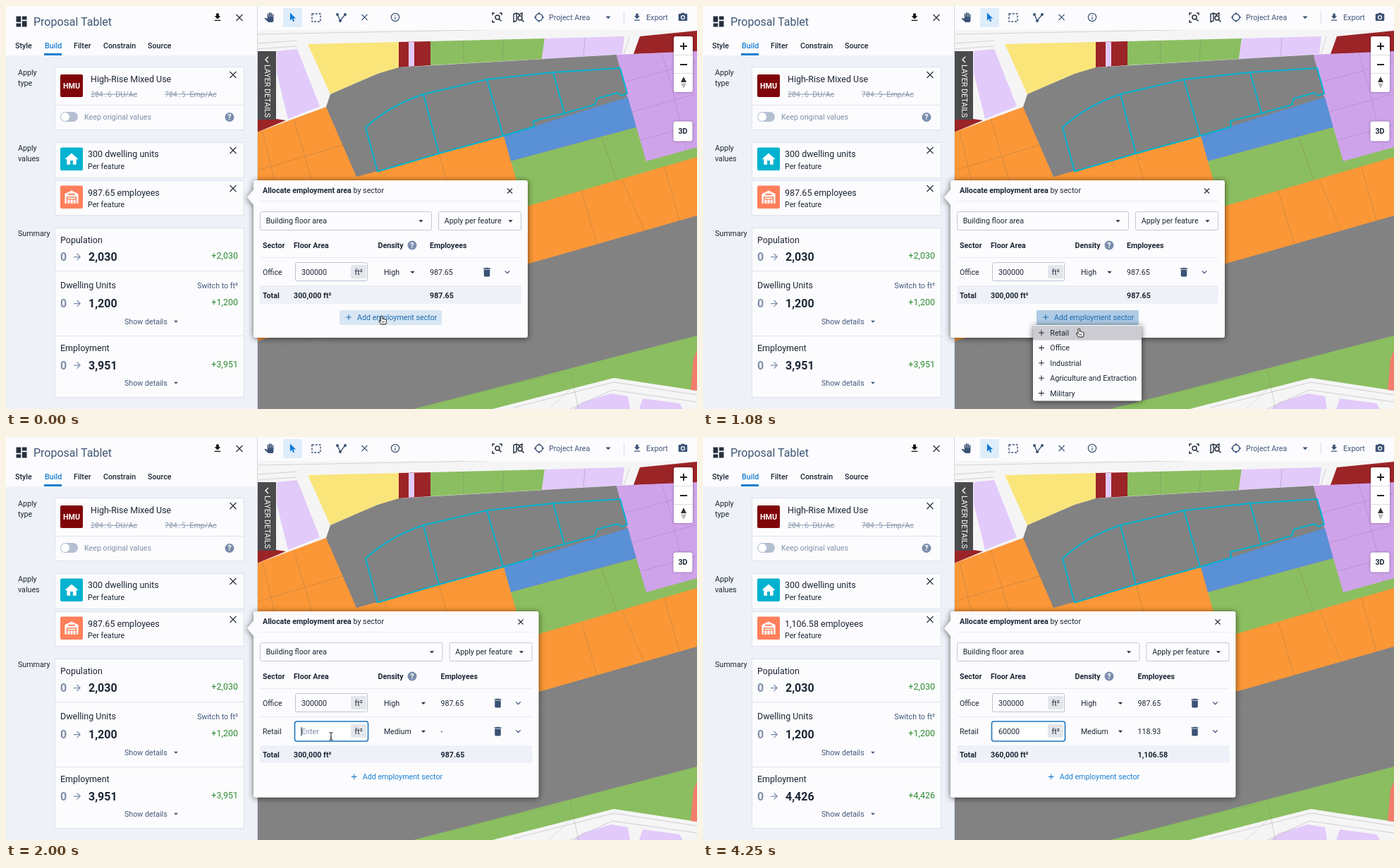
These frames come from a looping animation (980x571 px, 4410 ms). An HTML page:

```html
<!DOCTYPE html>
<html lang="en">
<head>
<meta charset="utf-8">
<title>Employment allocation</title>
<style>
  html, body { margin: 0; width: 100%; height: 100%; overflow: hidden; background: #fcfcfe; }
  svg { display: block; width: 100vw; height: 100vh; }
  text { font: 10.7px Roboto, sans-serif; fill: #1c2634; white-space: pre; }
  .bold { font-weight: 700; }
  .med { font-weight: 500; }
  .mid { font-size: 12.5px; }
  .big { font-size: 16px; font-weight: 700; }
  .title { font-size: 16px; fill: #3f5675; }
  .slate { fill: #41577a; }
  .muted { fill: #8090a8; }
  .blue { fill: #1b7fd1; }
  .deep { fill: #1c6aae; }
  .green { fill: #2e8b33; }
  .white { fill: #fff; }
  .old { fill: #8999ae; text-decoration: line-through; }
  .mono { font: 10px "Noto Sans Mono", monospace; }
  .end { text-anchor: end; }
  .center { text-anchor: middle; }
  .pop { filter: drop-shadow(0 1px 4px #0009); }
  .soft { filter: drop-shadow(0 0 1.5px #0006); }
</style>
</head>
<body>
<svg viewBox="0 0 980 571"><g id="base"></g><g id="live"></g></svg>
<script>
const INK = '#26303d', SLATE = '#3b5275', GREY = '#7a8dab', BLUE = '#1b7fd1', TEAL = '#00b2cf';
const PANEL = '#fcfcfe', PALE = '#eef2f8', RULE = '#dde3ec';
const ICONS = {
  download: 'M5 20h14v-2H5v2zM19 9h-4V3H9v6H5l7 7 7-7z',
  home: 'M10 20v-6h4v6h5v-8h3L12 3 2 12h3v8z',
  trash: 'M6 19c0 1.1.9 2 2 2h8c1.1 0 2-.9 2-2V7H6v12zM19 4h-3.5l-1-1h-5l-1 1H5v2h14V4z',
  drop: 'M7 10l5 5 5-5z',
  more: 'M16.6 8.6L12 13.2 7.4 8.6 6 10l6 6 6-6z',
  tiles: 'M3 13h8V3H3v10zm0 8h8v-6H3v6zm10 0h8V11h-8v10zm0-18v6h8V3h-8z',
  next: 'M12 4l-1.4 1.4L16.2 11H4v2h12.2l-5.6 5.6L12 20l8-8z',
  plus: 'M19 13h-6v6h-2v-6H5v-2h6V5h2v6h6v2z',
  info: 'M11 7h2v2h-2zm0 4h2v6h-2zm1-9a10 10 0 1 0 0 20a10 10 0 1 0 0-20zm0 18a8 8 0 1 1 0-16a8 8 0 1 1 0 16z',
  camera: 'M9 2L7.2 4H4c-1.1 0-2 .9-2 2v12c0 1.1.9 2 2 2h16c1.1 0 2-.9 2-2V6c0-1.1-.9-2-2-2h-3.2L15 2H9zm3 15a5 5 0 1 1 0-10a5 5 0 1 1 0 10zm0-2a3 3 0 1 0 0-6a3 3 0 1 0 0 6z',
  pointer: 'M5 1v19l4.6-4.4 3 7 3.2-1.4-3-6.8H19z',
  pan: 'M23 5.5V20c0 2.2-1.8 4-4 4h-7.3c-1 0-2-.4-2.8-1.2L1 14.8s1.3-1.3 2-1.5l5 2.6V4a1.5 1.5 0 0 1 3 0v7h1V1.5a1.5 1.5 0 0 1 3 0V11h1V2.5a1.5 1.5 0 0 1 3 0V11h1V5.5a1.5 1.5 0 0 1 3 0z',
  depot: 'M12 2L2 7v14h2.500V11h15v10H22V7zM7 6.500h10v2H7zM6 12.500h12v1.500H6zM6 15.500h3.300V21H6zm4.400 0h3.300V21h-3.300zm4.400 0H18V21h-3.200z'
};

const text = (x, y, s, cls = '') => `<text x="${x}" y="${y}" class="${cls}">${s}</text>`;
const rect = (x, y, w, h, fill, extra = '') =>
  `<rect x="${x}" y="${y}" width="${w}" height="${h}" fill="${fill}" ${extra}/>`;
const box = (x, y, w, h, stroke, r = 0, fill = PANEL) =>
  rect(x + .5, y + .5, w - 1, h - 1, fill, `stroke="${stroke}" rx="${r}"`);
const line = (d, stroke, width = 1, extra = '') =>
  `<path d="${d}" fill="none" stroke="${stroke}" stroke-width="${width}" ${extra}/>`;
const poly = (points, fill) => `<polygon points="${points}" fill="${fill}"/>`;
const icon = (name, x, y, size, fill = INK) =>
  `<path d="${ICONS[name]}" fill="${fill}" fill-rule="evenodd" transform="translate(${x - size / 2} ${y - size / 2}) scale(${size / 24})"/>`;
const cross = (x, y, r, color = INK) =>
  line(`M${x - r} ${y - r}l${2 * r} ${2 * r}m0 ${-2 * r}l${-2 * r} ${2 * r}`, color, 1.2);
const help = (x, y) => `<circle cx="${x}" cy="${y}" r="6.5" fill="${GREY}"/>` + text(x, y + 3.8, '?', 'bold white center');

function cityMap() {
  const grey = '#828283', orange = '#fb9737', green = '#8bbe60', lilac = '#e2cafa',
    purple = '#cfa3ea', red = '#9b2427';
  return rect(356, 34, 624, 537, '#f5f5f6') +
    line('M356 40L980 28M356 53L413 49M356 61L412 57M884 44L876 69', '#d2d2d5') +
    poly('428,54 557,51 557,89 527,96 460,125', '#fae57b') +
    poly('557,51 602,50 602,84 557,87', red) + poly('571,51 579,51 579,85 571,86', lilac) +
    poly('602,50 764,46 760,75 602,84', green) + poly('764,46 877,43 874,68 760,75', lilac) +
    poly('899,43 980,35 980,65 890,68', red) +
    poly('384,64 413,61 445,142 400,160 384,95', lilac) + poly('356,160 383,160 397,162 356,179', red) +
    poly('356,179 454,143 866,90 980,90 980,300 356,478', orange) +
    poly('460,125 527,96 557,87 866,69 894,172 706,184 497,242 454,143', grey) +
    poly('866,69 980,64 980,205 905,225', purple) +
    poly('706,184 882,129 894,172 716,220', '#5a90d5') +
    poly('716,220 894,172 908,220 980,200 980,214 735,285', green) +
    poly('356,475 980,297 980,571 356,571', grey) +
    poly('578,571 980,467 980,571', green) +
    poly('690,571 862,527 980,545 980,571', '#f5f5f6') +
    poly('805,571 818,561 858,549 882,553 885,571', lilac) +
    poly('898,571 903,556 955,563 960,571', lilac) + poly('975,500 980,488 980,545 971,544', '#f27d6c') +
    line('M720 569L862 533L980 551M800 571L860 544L980 561', '#cfcfd3') +
    line('M649 49V81M706 47L704 78M821 45L819 71', '#77777755') +
    line('M875 108L980 80M888 150L980 124M900 190L980 168M930 67L943 110L965 204', '#88669944') +
    line('M356 233L478 197M364 178L386 270M408 160L434 247M614 209L625 247M816 262L838 337M874 246L905 318M934 228L955 304M845 186L866 247', '#8a704d55') +
    line('M470 125L700 185L860 90M530 96L640 190M356 500L980 322M770 571L980 378', '#92929444') +
    line('M800 514L812 571M625 559L700 540L790 519', '#76945e55') +
    line('M510 172Q544 141 592 125L682 104L776 94L871 88L881 124L873 127L867 123L838 131L835 140L792 152L748 163L749 171L705 184L614 209L527 234.500ZM592 125L614 209M682 104L705 184M776 94L792 152', TEAL, 2);
}

function toolbar() {
  const dashed = (x, y) => line(`M${x} ${y}h12v11h-12z`, SLATE, 1.4, 'stroke-dasharray="3 1.8"');
  const lens = (x, y) => line(`M${x + 3} ${y}a3 3 0 1 0-6 0a3 3 0 1 0 6 0m-1 2l3.5 3.5`, INK, 1.5);
  return rect(356, 0, 624, 34, PANEL) + line('M356.5 0V571', '#d3d9e2') +
    icon('pan', 373, 16, 14, SLATE) + rect(393, 3, 27, 27, '#dfedfa', 'rx="2"') + icon('pointer', 407, 16, 14, '#0f7ad8') +
    dashed(434, 11) + line('M470 12L474 21L481 12', SLATE, 1.4) +
    [[470, 12], [481, 12], [474, 21]].map(([x, y]) => `<circle cx="${x}" cy="${y}" r="2" fill="${SLATE}"/>`).join('') +
    cross(508.5, 16, 4, SLATE) + icon('info', 552, 16, 15, SLATE) +
    line('M690 13v-3h3m7 0h3v3m-13 7v3h3', INK, 1.5) + lens(697, 16) +
    line('M732 14V10l-4 2l-4-2l-4 1.5v11l4-1.5M724 10v11m4-9v2', INK, 1.4) + lens(729, 17) +
    line('M761 16a5 5 0 1 0-10 0a5 5 0 1 0 10 0M756 9v3m0 8v3m-7-7h3m8 0h3', SLATE, 1.4) +
    text(770, 20, 'Project Area', 'slate') + icon('drop', 854, 16, 17, SLATE) +
    line('M876.5 8V25', '#d3d9e2') + icon('download', 895, 16, 14, SLATE) +
    text(908, 20, 'Export', 'slate') + icon('camera', 960, 16, 15, SLATE);
}

function mapControls() {
  return rect(357, 64, 26, 97, '#4b4b4e') + line('M372 72l-4 4l4 4', '#fff', 1.4) +
    `<g transform="translate(366.5 83) rotate(90)">${text(0, 0, 'LAYER DETAILS', 'white')}</g>` +
    `<g class="soft">${rect(947, 43, 27, 79, '#fff', 'rx="3"') + rect(946.5, 163.5, 27, 28, '#fff', 'rx="3"')}</g>` +
    line('M947 69.5h27M947 95.5h27', '#ddd') + line('M956 57h10m-5-5v10M956 83h10', '#222', 2) +
    poly('957,108 965,108 961,100', '#333') + poly('957,109.5 965,109.5 961,117', '#bbb') +
    text(960, 181.3, '3D', 'bold center');
}

function sidePanel() {
  const tabs = [[13, 'Style'], [55, 'Build'], [96, 'Filter'], [138, 'Constrain'], [201, 'Source']];
  const counter = (y, total) => text(77, y, '0', 'big muted') + icon('next', 101, y - 5.5, 15, GREY) +
    (total ? text(117, y, total, 'big') : '');
  const details = y => text(168, y, 'Show details', 'slate') + icon('drop', 241, y - 3.5, 14, SLATE);
  const tile = (y, fill, name) => rect(77, y, 32, 32.5, fill, 'rx="2"') + icon(name, 93, y + 16.5, 23, '#fff');
  return rect(0, 0, 356, 70, PANEL) + rect(0, 70, 356, 501, PALE) +
    icon('tiles', 22, 22, 20) + text(39, 27.5, 'Proposal Tablet', 'title') +
    icon('download', 300, 16, 15, '#111') + cross(331, 16.5, 4.5) +
    tabs.map(([x, s]) => text(x, 60, s, s === 'Build' ? 'med blue' : 'med')).join('') + rect(54, 67, 25, 3, BLUE) +
    text(17, 97.5, 'Apply') + text(17, 112.5, 'type') + text(17, 204.5, 'Apply') + text(17, 219.5, 'values') + text(17, 325.5, 'Summary') +
    box(69, 86, 269, 90, RULE) + box(69, 193, 269, 51, RULE) + box(69, 247, 269, 50, RULE) + box(69, 314, 269, 241, RULE) +
    line('M69 140.5h268M69 375.5h268M69 467.5h268', RULE) +
    rect(77, 97, 32, 32, '#800508', 'rx="2"') + text(93, 117, 'HMU', 'bold white center') +
    text(120, 108, 'High-Rise Mixed Use', 'mid') + [97.5, 204.5, 258.5].map(y => cross(322, y, 4.5)).join('') +
    text(120, 128.5, '204.6', 'old mono') + text(150, 128.5, '  DU/Ac', 'old') +
    text(225, 128.5, '704.5', 'old mono') + text(255, 128.5, '  Emp/Ac', 'old') +
    rect(77, 150, 25, 14, '#b4c0d1', 'rx="7"') + '<circle cx="84" cy="157" r="6" fill="#fff"/>' +
    text(111, 161, 'Keep original values', 'muted') + help(317, 157.5) +
    tile(200.5, TEAL, 'home') + text(116, 214, '300 dwelling units', 'mid') + text(116, 230.5, 'Per feature') +
    tile(254.5, '#ff7f5b', 'depot') + text(116, 284.5, 'Per feature') +
    text(77, 335.5, 'Population', 'mid') + counter(361, '2,030') + text(329, 358, '+2,030', 'mid green end') +
    text(77, 399.5, 'Dwelling Units', 'mid') + text(329, 399.5, 'Switch to ft²', 'slate end') +
    counter(427, '1,200') + text(329, 423.5, '+1,200', 'mid green end') + details(450.5) +
    text(77, 489, 'Employment', 'mid') + counter(514.5) + details(537.5);
}

function tableRow(y, dx, label, area, density, staff, focused) {
  return text(364, y + 3.8, label) +
    (focused ? rect(409.5, y - 14, 104, 28, '#fff', 'stroke="#1c74bd" stroke-width="1.6" rx="3"')
             : box(410, y - 14, 103, 27, '#bcc3cd', 2)) +
    text(419, y + 3.8, area || 'Enter', area ? '' : 'muted') +
    rect(489, y - 10, 22, 19, '#e3e6eb', 'rx="2"') + text(500, y + 3.8, 'ft²', 'center') +
    text(536, y + 3.8, density) + icon('drop', 576.5 + dx, y, 15) + text(601 + dx, y + 3.8, staff) +
    icon('trash', 682 + dx, y, 17, SLATE) + icon('more', 711 + dx, y, 15, SLATE);
}

function popup(t, typed, focused, done) {
  const twoRows = t >= 1330, dx = t >= 1500 ? 15.5 : 0, dy = twoRows ? 40 : 0;
  const right = 740 + dx, bottom = 470 + dy * 1.02, buttonY = 441 + dy * 1.01;
  const select = (x, w, s) => box(x, 291, w, 27, '#c2c8d1', 2) + text(x + 8.7, 308, s) + icon('drop', x + w - 15.5, 304.5, 15);
  const columns = [[364, 'Sector'], [408, 'Floor Area'], [527.5, 'Density'], [601 + dx, 'Employees']];
  return `<path class="pop" fill="${PANEL}" d="M351 260V250q0-3 3-3H${right - 3}q3 0 3 3V${bottom - 3}q0 3-3 3H354q-3 0-3-3V282L342 271Z"/>` +
    text(364, 265, '<tspan class="bold">Allocate employment area</tspan> by sector') + cross(714.5 + dx, 262, 3.5) +
    line(`M360 276.5H${731 + dx}M360 356.5H${731 + dx}M360 396.5H${731 + dx}`, '#e6eaf0') +
    select(360, 244 + dx, 'Building floor area') + select(613 + dx, 118, 'Apply per feature') +
    columns.map(([x, s]) => text(x, 342.7, s, 'bold')).join('') +
    help(576, 339) + tableRow(377, dx, 'Office', '300000', 'High', '987.65') +
    (twoRows ? tableRow(417, dx, 'Retail', typed, dx ? 'Medium' : '', done ? '118.93' : '-', focused) : '') +
    rect(360, 397 + dy, 371 + dx, 25, PALE) + text(364, 413.5 + dy, 'Total', 'bold') +
    text(408, 413.5 + dy, done ? '360,000 ft²' : '300,000 ft²', 'bold') +
    text(601 + dx, 413.5 + dy, done ? '1,106.58' : '987.65', 'bold') +
    (twoRows ? '' : rect(473, 431, 145, 21, t < 80 ? '#d9e6f3' : '#afcbe5', 'rx="2"')) +
    icon('plus', 486 + dx / 2, buttonY, 13, twoRows ? BLUE : '#1c6aae') +
    text(498 + dx / 2, buttonY + 3.8, 'Add employment sector', twoRows ? 'blue' : 'deep');
}

function menu(opacity, hover) {
  const items = ['Retail', 'Office', 'Industrial', 'Agriculture and Extraction', 'Military'];
  return `<g opacity="${opacity}">${rect(468, 452, 154, 107.5, PANEL, 'class="pop" rx="2"')}` +
    (hover ? rect(468, 453, 154, 20.5, '#cbcbd1') : '') +
    items.map((s, i) => icon('plus', 480, 463 + i * 21.4, 13) + text(492.3, 467 + i * 21.4, s)).join('') + '</g>';
}

const CURSORS = {
  hand: '<path d="M-1.5 .5Q0-1 1 .5V4.5Q2 3.5 3 4.8Q4.2 4 5 5.3Q6.5 5 6.500 6.500V8.500Q6.500 10 5.500 12H-1L-4 8Q-4.500 6.300-3 6.500L-1.500 8Z" fill="#fff" stroke="#111"/><path d="M1 7v3m2-3v3" stroke="#111" stroke-width=".7"/>',
  arrow: '<path d="M0 0V9.5L2.2 7.5L3.7 11L5.3 10.3L3.8 7H7Z" fill="#111" stroke="#fff" stroke-width=".7"/>',
  beam: '<path d="M-2.5-5.5Q0-5.5 0-4Q0-5.5 2.5-5.5M0-4V4M-2.5 5.5Q0 5.5 0 4Q0 5.5 2.5 5.5M-1 2h2" fill="none" stroke="#111"/>'
};

const clamp = v => Math.min(1, Math.max(0, v));
const ease = v => v * v * (3 - 2 * v);
const progress = (t, from, to) => ease(clamp((t - from) / (to - from)));

function cursor(t) {
  if (t >= 2830) return '';
  const down = progress(t, 580, 1080), over = progress(t, 1500, 2000);
  let x = 533 + down / 2, y = 439 + 18 * down, shape = 'hand';
  if (t >= 1500) {
    x = 528 - 67 * over;
    y = 458 - 34 * over;
    shape = x < 513 && y < 431 ? 'beam' : 'arrow';
  }
  return `<g transform="translate(${x} ${y})">${CURSORS[shape]}</g>`;
}

function scene(t) {
  const keys = [2830, 3000, 3170, 3330, 3500];
  const count = keys.filter(k => t >= k).length, typed = '60000'.slice(0, count);
  const focused = t >= 2000, done = t >= 3750;
  const lastKey = count ? keys[count - 1] : 2000;
  const caretOn = focused && (t - lastKey) % 1000 < 500;
  const caretX = 419 + count * 6.01;
  const opacity = t < 1250 ? clamp((t - 80) / 240) : t < 1330 ? .4 : 0;
  return text(116, 268.5, done ? '1,106.58 employees' : '987.65 employees', 'mid') +
    text(117, 514.5, done ? '4,426' : '3,951', 'big') +
    text(329, 511.5, done ? '+4,426' : '+3,951', 'mid green end') +
    popup(t, typed, focused, done) +
    (opacity ? menu(opacity, progress(t, 580, 1080) > .55) : '') +
    (caretOn ? line(`M${caretX} 411V423.5`, '#111') : '') + cursor(t);
}

const LOOP = 4410, STEP = 1000 / 12;
const base = document.getElementById('base'), live = document.getElementById('live');
base.innerHTML = cityMap() + toolbar() + mapControls() + sidePanel();
let shown = '';
function draw() {
  // screen updates come twelve times a second
  const tick = Math.floor((performance.now() % LOOP + 4) / STEP);
  const markup = scene(Math.round(tick * STEP) + 4);
  if (markup !== shown) live.innerHTML = shown = markup;
  requestAnimationFrame(draw);
}
draw();
</script>
</body>
</html>
```
